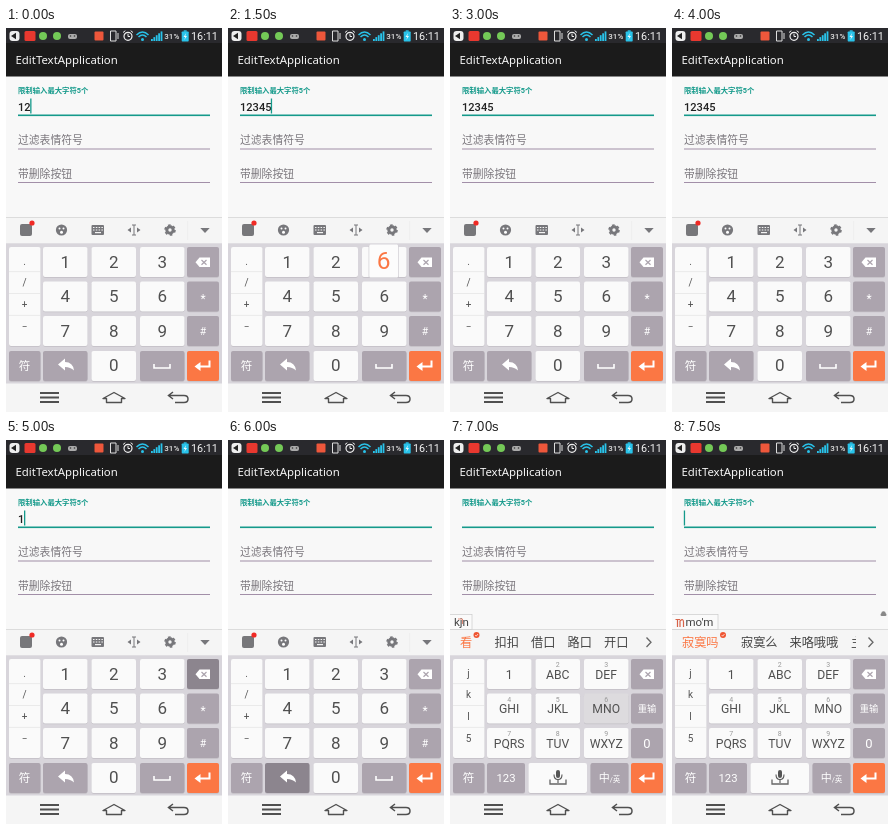
Animation, 216 px wide and 384 px high, one loop 8000 ms. Source, as an HTML page:

```html
<!DOCTYPE html>
<html lang="zh">
<head>
<meta charset="utf-8">
<title>Edit text demo</title>
<style>
html, body { margin: 0; width: 100%; height: 100%; overflow: hidden; background: #f8f8f8; }
svg { display: block; width: 100vw; height: 100vh; font-family: Roboto, "Noto Sans CJK SC", "Noto Sans CJK", sans-serif; }
.title { font-family: "Noto Sans", sans-serif; }
</style>
</head>
<body>
<svg id="stage" viewBox="0 0 216 384"></svg>
<script>
const STEP = 500, STEPS = 16;
const TEAL = '#159a8b', GREY = '#aca4ae', ORANGE = '#fb7744', INK = '#505050', ICON = '#77777b';
const COLS = [37, 85.5, 134], ROWS = [219, 253.5, 288, 323];
const KEY_W = 44.5, KEY_H = 30;

const rect = (x, y, w, h, fill, extra = '') =>
  `<rect x="${x}" y="${y}" width="${w}" height="${h}" fill="${fill}" ${extra}/>`;
const circle = (x, y, r, fill, extra = '') =>
  `<circle cx="${x}" cy="${y}" r="${r}" fill="${fill}" ${extra}/>`;
const line = (d, color, width = 1, extra = '') =>
  `<path d="${d}" fill="none" stroke="${color}" stroke-width="${width}" ${extra}/>`;
const shape = (d, fill) => `<path d="${d}" fill="${fill}"/>`;
const text = (x, y, s, size, fill, extra = '') =>
  `<text x="${x}" y="${y}" font-size="${size}" fill="${fill}" ${extra}>${s}</text>`;
const mid = (x, y, s, size, fill, extra = '') =>
  text(x, y, s, size, fill, 'text-anchor="middle" ' + extra);
const key = (x, y, w, h, fill) =>
  rect(x, y + .7, w, h, '#c2bfc5', 'rx="2"') + rect(x, y, w, h, fill, 'rx="2"');

function statusBar() {
  let s = rect(0, 0, 216, 15.5, '#29292d');
  s += rect(3.5, 3, 10, 10, '#eee', 'rx="3"') + shape('M5 8L10 4.7V11.3Z', '#222');
  s += rect(18.5, 3, 11, 10, '#e8382f', 'rx="1.5"') + circle(37, 8, 4, '#74c957') + circle(51, 8, 4, '#74c957');
  s += rect(62, 6, 9, 5, '#aaa', 'rx="2"') + circle(64.5, 8, .8, '#333') + circle(68.5, 8, .8, '#333');
  s += rect(88.5, 3.5, 9, 9, '#ee573b', 'rx="1"');
  s += line('M104.5 3H110V13H104.5Z M112 5V11', '#ddd');
  s += circle(122, 8.3, 4, 'none', 'stroke="#eee" stroke-width="1.2"') +
    line('M122 5.7V8.5H124 M117 4.5L119.3 2.7 M127 4.5L124.7 2.7', '#eee');
  s += line('M130.5 7Q136.5 1 142.5 7 M132.5 9Q136.5 5 140.5 9', '#29c3ea', 1.5) + circle(136.5, 11.5, 1.5, '#29c3ea');
  for (let i = 0; i < 5; i++) s += rect(145 + i * 2.4, 11 - i * 1.9, 1.8, 2 + i * 1.9, '#29c3ea');
  s += mid(165.8, 11, '31%', 8, '#e4e4e4', 'font-weight="500"');
  s += rect(177.7, 2.3, 3, 1.5, '#29c3ea') + rect(175.7, 3.5, 7, 10, '#29c3ea', 'rx=".7"') +
    shape('M180.2 5L177.5 9H179.2L178.3 12L181 8H179.3Z', '#e8f8fc');
  return s + mid(198.5, 12, '16:11', 10.8, '#f4f4f4');
}

function form(typed, cursor) {
  let s = rect(0, 48, 216, 142, '#f8f8f8') + rect(0, 15, 216, 33.5, '#1b1b1b');
  s += text(9.5, 36, 'EditTextApplication', 11.4, '#f6f6f6', 'class="title"');
  s += text(12, 65, '限制输入最大字符5个', 7.35, TEAL, 'font-weight="700"');
  s += text(12, 82.5, typed, 11.1, '#222', 'font-weight="500"') + rect(12, 86.5, 192, 1.6, TEAL);
  if (cursor) s += rect(11.8 + typed.length * 6.2, 70.5, 1.3, 15, TEAL);
  s += text(12, 116, '过滤表情符号', 10.8, '#79757b') + rect(12, 120.5, 192, 1, '#a28fa8');
  return s + text(12, 149.5, '带删除按钮', 10.8, '#79757b') + rect(12, 154, 192, 1, '#a28fa8');
}

function toolbar() {
  let s = rect(14, 196, 12, 12, '#77777a', 'rx="2"') + circle(26, 195, 2.6, '#f02a25');
  s += circle(55.5, 202, 5.6, ICON) + circle(53.5, 200.5, 1, '#fff') + circle(57.5, 200.5, 1, '#fff') +
    circle(55.5, 204.3, 1.5, '#fff');
  s += rect(85.5, 197, 12.5, 10, ICON, 'rx="1"') +
    line('M87 199.5H97 M87 202H97', '#f4f4f4', 1.2, 'stroke-dasharray="1.5 1.3"') + rect(89, 204, 6, 1.2, '#f4f4f4');
  s += line('M128 197V207 M126 197H130 M126 207H130', ICON) +
    shape('M121.5 202L125 199.5V204.5Z M134.5 202L131 199.5V204.5Z', ICON);
  s += circle(164, 202, 3.2, 'none', `stroke="${ICON}" stroke-width="3"`) +
    circle(164, 202, 5, 'none', `stroke="${ICON}" stroke-width="1.6" stroke-dasharray="2.618 2.618"`);
  s += rect(181.5, 193, .6, 19, '#e9e9e9');
  return s + shape('M194.3 200H203.7L199 205Z', ICON);
}

function candidates(words, badge) {
  const list = words.map(([x, word], i) =>
    text(x, 206.5, word, 12.2, i ? '#444' : ORANGE, 'font-weight="500"')).join('');
  return `<svg width="184" height="384">${list}</svg>` + circle(badge, 195, 3, '#ef5532') +
    line(`M${badge - 1.3} 195l1 1.2 1.8-2.2`, '#fff', .7) + line('M196.5 197.5L201 202.3L196.5 207', '#666', 1.3);
}

function composing(pinyin, x, width) {
  return rect(-1, 174.5, width, 15, '#fafafa', 'stroke="#ccc" stroke-width=".7"') + text(x, 186, pinyin, 11.5, '#444');
}

function sideKeys(symbols) {
  let s = key(3, 219, 31.5, 99, '#fafafa');
  symbols.forEach((c, i) => {
    s += mid(18.5, 236.5 + i * 21.7, c, 10, '#555');
    if (i) s += rect(3, 221.8 + i * 21.7, 31.5, .6, '#e0e0e0');
  });
  return s;
}

function commonKeys(deleting) {
  let s = key(181, 219, 32, KEY_H, deleting ? '#8c858e' : GREY);
  s += shape('M189.5 234.3L193.5 229.5H204V239H193.5Z', '#fff') + line('M195.5 232L200.5 236.7 M200.5 232L195.5 236.7', GREY, 1.2);
  s += key(3, ROWS[3], 31.5, KEY_H, GREY) + mid(18.5, 342, '符', 11.5, '#fff');
  s += key(181, ROWS[3], 32, KEY_H, ORANGE);
  return s + line('M203.5 332.5V338.5H193', '#fff', 2) + shape('M188.5 338.5L194.5 334V343Z', '#fff');
}

function numberPad(switching) {
  let s = sideKeys(['.', '/', '+', '−']);
  for (let i = 0; i < 9; i++) {
    const x = COLS[i % 3], y = ROWS[i / 3 | 0];
    s += key(x, y, KEY_W, KEY_H, '#fafafa') + mid(x + 22.2, y + 20.8, i + 1, 17, INK);
  }
  s += key(181, ROWS[1], 32, KEY_H, GREY) + mid(197, 275, '*', 12, '#fff');
  s += key(181, ROWS[2], 32, KEY_H, GREY) + mid(197, 307, '#', 10.5, '#fff');
  s += key(COLS[0], ROWS[3], KEY_W, KEY_H, switching ? '#8c858e' : GREY);
  s += shape('M52 336.5L59 330.5V334Q67 334 68 342.5Q64.5 339 59 339V342.5Z', '#fff');
  s += key(COLS[1], ROWS[3], KEY_W, KEY_H, '#fafafa') + mid(107.7, 343, '0', 17, INK);
  return s + key(COLS[2], ROWS[3], KEY_W, KEY_H, GREY) + line('M148 336V340H164V336', '#fff', 1.6);
}

function letterPad(typing, pressed) {
  const names = ['1', 'ABC', 'DEF', 'GHI', 'JKL', 'MNO', 'PQRS', 'TUV', 'WXYZ'];
  let s = sideKeys(typing ? ['j', 'k', 'l', '5'] : ['，', '。', '？', '！']);
  names.forEach((name, i) => {
    const x = COLS[i % 3], y = ROWS[i / 3 | 0];
    s += key(x, y, KEY_W, KEY_H, name === pressed ? '#dddbde' : '#fafafa');
    s += mid(x + 22.2, y + 19.7, name, 12.2, INK);
    if (i) s += mid(x + 22.2, y + 8.3, i + 1, 7, '#999');
  });
  s += key(181, ROWS[1], 32, KEY_H, GREY) + mid(197, 272.2, '重输', 9.3, '#fff');
  s += key(181, ROWS[2], 32, KEY_H, GREY) + mid(197, 308, '0', 13, '#fff');
  s += key(37, ROWS[3], 38, KEY_H, GREY) + mid(56, 342, '123', 11.3, '#fff');
  s += key(78.5, ROWS[3], 58.5, KEY_H, '#fafafa') + rect(106, 330, 4, 8, '#555', 'rx="2"') +
    line('M104 334.5Q104 339.5 108 339.5Q112 339.5 112 334.5 M108 339.5V343', '#555', 1.1) +
    line('M100 339.5V344H116V339.5', '#666', 1.3);
  s += key(140.5, ROWS[3], 38, KEY_H, GREY);
  return s + mid(159.5, 342, '中<tspan font-size="7.5">/英</tspan>', 11, '#fff');
}

function popup(digit, x, y) {
  return rect(x - 15, y - 16, 30, 33, '#c4c1c7', 'rx="1.5"') + rect(x - 14.5, y - 16.5, 29, 33, '#fcfcfc', 'rx="1.5"') +
    mid(x, y + 8, digit, 24.5, ORANGE);
}

function navBar() {
  return rect(0, 355.5, 216, 29, '#f5f5f5') +
    line('M34 365H53 M34 369.5H53 M34 374H53', '#505050', 1.8) +
    line('M97 370.5L108 364.5L119 370.5H115.5V374.5H100.5V370.5Z', '#505050', 1.4, 'stroke-linejoin="round"') +
    line('M167 364L162.5 367.5L167 371 M162.5 367.5H178Q182 367.5 182 371Q182 374.5 178 374.5H169', '#505050', 1.5);
}

function typedAt(n) {
  if (n < 9) return '12345'.slice(0, n + 2);
  return n === 9 ? '1234' : n === 10 ? '1' : '';
}

function scene(n) {
  const cursor = n < 4 || n % 2 || n === 10;
  let s = statusBar() + form(typedAt(n), cursor);
  s += rect(0, 189, 216, 27, '#f5f5f5') + rect(0, 189, 216, .7, '#d2d2d2') + rect(0, 215.3, 216, 141, '#d8d5db');
  s += commonKeys(n === 9 || n === 10);
  s += n < 13 ? numberPad(n === 12) : letterPad(n > 13, n === 14 ? 'MNO' : '');
  if (n < 14) s += toolbar();
  if (n === 3) s += popup(6, 155.7, 233);
  if (n === 5) s += popup(8, 108, 267.5);
  if (n === 14) {
    s += candidates([[10, '看'], [44.5, '扣扣'], [81, '借口'], [117.5, '路口'], [154, '开口']], 26.5);
    s += composing('kjn', 4, 23) + line('M8 179H12.5V184', '#df745c', .8);
  }
  if (n === 15) {
    s += candidates([[10, '寂寞吗'], [69, '寂寞么'], [117.5, '来咯哦哦'], [179, '主']], 51);
    s += composing("mo'm", 13.5, 47) + line('M3.5 179.5H8 M5.5 179.5V187 M8 187V181Q11.5 178 11.5 182V187', '#d86248', 1.2);
    s += circle(211.5, 173.5, 2.2, '#888') + rect(208.5, 173.5, 6, 2.5, '#888', 'rx="1.2"');
  }
  return s + navBar();
}

const stage = document.getElementById('stage');
const start = performance.now();
let shown = -1;
function draw() {
  const n = Math.floor(Math.max(0, performance.now() - start) / STEP) % STEPS;
  if (n !== shown) stage.innerHTML = scene(shown = n);
  requestAnimationFrame(draw);
}
draw();
</script>
</body>
</html>
```
